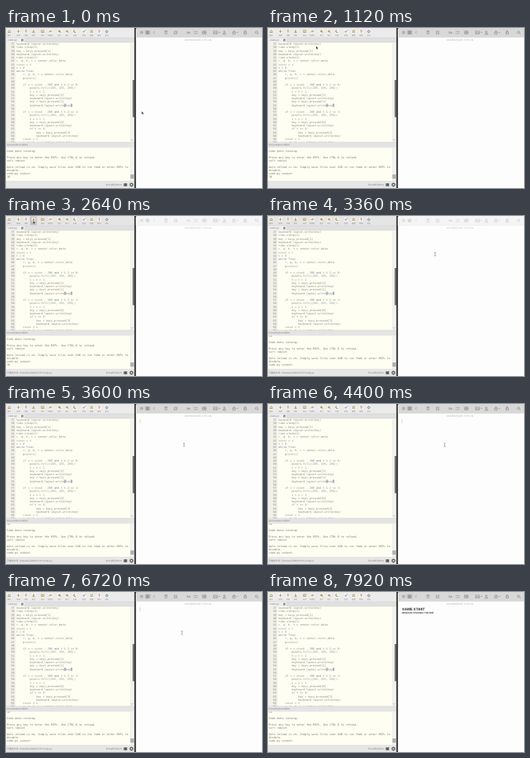
Write an HTML page that moves like this. It is 320 px wide and 200 px high and loops after 8000 ms.

```html
<!DOCTYPE html>
<html>
<head>
<meta charset="utf-8">
<style>
html, body { margin: 0; width: 100%; height: 100%; overflow: hidden; background: #fff; }
svg { display: block; width: 100vw; height: 100vh; }
text { text-rendering: geometricPrecision; white-space: pre; }
.mono { font: 3.42px "DejaVu Sans Mono", monospace; fill: #85857f; }
.repl { fill: #767670; }
.key { fill: #7a7aa2; }
.num { fill: #7c9090; }
.ui { font: 3.1px Inter, "Noto Sans CJK SC", sans-serif; fill: #777; }
.tiny { font: 2.2px "Noto Sans CJK SC", sans-serif; fill: #888; text-anchor: middle; }
.note { font-family: Inter, sans-serif; font-weight: 700; fill: #333; }
</style>
</head>
<body>
<svg id="stage" viewBox="0 0 320 200" preserveAspectRatio="none"></svg>
<script>
const LOOP = 8000, PITCH = 4.25, CHAR = 2.06, SPLIT = 160.6;
const PAPER = '#fefef2';
const stage = document.getElementById('stage');

function add(parent, tag, attrs, content) {
  const el = document.createElementNS('http://www.w3.org/2000/svg', tag);
  for (const k in attrs) el.setAttribute(k, attrs[k]);
  if (content !== undefined) el.textContent = content;
  parent.appendChild(el);
  return el;
}
const rect = (p, x, y, width, height, fill, rx = 0) => add(p, 'rect', { x, y, width, height, fill, rx });
const label = (p, x, y, s, cls, more) => add(p, 'text', { x, y, class: cls, ...more }, s);
const line = (p, d, stroke, w = 0.6) =>
  add(p, 'path', { d, stroke, fill: 'none', 'stroke-width': w, 'stroke-linecap': 'round' });
const group = (p = stage, attrs = {}) => add(p, 'g', attrs);
const show = (el, on) => el.setAttribute('visibility', on ? 'visible' : 'hidden');

const code = `keyboard_layout.write(key)
time.sleep(1)
key = keys_pressed[1]
keyboard_layout.write(key)
time.sleep(1)
r, g, b, c = sensor.color_data
cisst = c
t = 0
while True:
    r, g, b, c = sensor.color_data
    print(c)

    if c < cisst - 200 and t % 2 == 0:
        pixels.fill((255, 255, 255))
        t = t + 1
        key = keys_pressed[2]
        keyboard_layout.write(key)
        key = keys_pressed[1]
        keyboard_layout.write(key)

    if c < cisst - 200 and t % 2 == 1:
        pixels.fill((255, 255, 255))
        t = t + 1
        key = keys_pressed[0]
        keyboard_layout.write(key)
        if t >= 4:
            key = keys_pressed[3]
            keyboard_layout.write(key)
    cisst = c
    r, g, b, c = sensor.color_data`.split('\n');

const output = `18

Code done running.

Press any key to enter the REPL. Use CTRL-D to reload.
soft reboot

Auto-reload is on. Simply save files over USB to run them or enter REPL to
disable.
code.py output:
18`.split('\n');

function codeLine(p, s, i) {
  const y = 21.2 + i * PITCH, indent = s.search(/\S|$/);
  label(p, 10.6, y, 37 + i, 'mono', { 'text-anchor': 'end' });
  const t = label(p, 13 + indent * CHAR, y, '', 'mono');
  for (const part of s.trim().split(/\b(while|if|and|True|\d+)\b/)) {
    const cls = /^\d+$/.test(part) ? 'num' : /^(while|if|and|True)$/.test(part) ? 'key' : '';
    add(t, 'tspan', { class: cls }, part);
  }
}

// Editor window
rect(stage, 0, 0, SPLIT, 200, PAPER);
rect(stage, 0, 18, 12, 125, '#f1f1ea');
const codeArea = group();
for (const col of [29, 33]) rect(codeArea, 12.8 + col * CHAR, 94.6, 2.3, 4, '#b4bad6');
code.forEach((s, i) => codeLine(codeArea, s, i));

const bar = rect(stage, 0, 0, SPLIT, 12, '#ebebeb');
rect(stage, 0, 12, SPLIT, 6, '#e0e0e0');
rect(stage, 0, 12.3, 23, 5.7, '#efefef');
label(stage, 2, 16.2, 'code.py', 'ui');
rect(stage, 19, 13.8, 2.6, 2.6, '#777', 0.5);
line(stage, 'M19.7 14.5l1.2 1.2m0 -1.2l-1.2 1.2', '#eee', 0.35);
line(stage, 'M0 12H160M23 18H160', '#cccccc', 0.4);

const saveGlow = rect(stage, 30, 0.6, 8.6, 11, '#c4c4c4', 1);
const lens = 'M-1.7 -.2A1.5 1.5 0 1 1 1.3 -.2A1.5 1.5 0 1 1 -1.7 -.2M1 1L2.2 2.2M-1 -.2H.6';
const toolGroups = [
  [['模式', 'M-1.5 1.8V-1.5H1.5V1.8M-2 1.8H2']],
  [['新建', 'M0 -2V2M-2 0H2'],
   ['加载', 'M0 2V-2M-1.7 -.2L0 -2L1.7 -.2'],
   ['保存', 'M0 -2V1M-1.7 -.6L0 1L1.7 -.6M-2 2H2']],
  [['串口', 'M-2 -1.8H2V1.8H-2ZM-1 -.6L0 .2L-1 1'],
   ['绘图仪', 'M-2 1L-1 -1L0 1.4L1 -1.8L2 0']],
  [['放大', lens + 'M-.2 -1V.6'],
   ['缩小', lens],
   ['主题', 'M1.3 1.5A2 2 0 1 1 0 -2A1.6 1.6 0 0 0 1.3 1.5']],
  [['检查', 'M-1.8 0L-.5 1.6L2 -1.8', '#55627a'],
   ['整理', 'M-2 -1.5H2M-1.4 0H1.4M-2 1.5H2'],
   ['帮助', 'M-1.2 -1A1.2 1.2 0 1 1 0 .4V.8M0 1.9V2', '#b5574a'],
   ['退出', 'M-1 -1.4A2 2 0 1 0 1 -1.4M0 -2V0', '#55627a']]
];
let toolX = 4;
for (const tools of toolGroups) {
  for (const [name, d, color = '#a5853c'] of tools) {
    rect(stage, toolX - 2.4, 1.8, 4.8, 4.8, '#f8f7f0', 0.8);
    line(group(stage, { transform: `translate(${toolX} 4.2) scale(.75)` }), d, color, 0.9);
    label(stage, toolX, 10, name, 'tiny');
    toolX += 9.5;
  }
  toolX += 2;
}

// Scroll bars
rect(stage, 155, 18, SPLIT - 155, 125, '#f1f1ee');
rect(stage, 158.4, 65, SPLIT - 158.4, 46.5, '#666');
line(stage, 'M156.5 139.5l1 1l1 -1', '#888', 0.5);

// REPL panel
rect(stage, 0, 143, SPLIT, 57, PAPER);
const repl = group();
output.forEach((s, i) => label(repl, 1, 147.1 + i * 4, s, 'mono repl'));
rect(stage, 0, 142.8, SPLIT, 6.8, '#e4e4e4');
line(stage, 'M0 142.8H160', '#cacaca', 0.4);
label(stage, 1, 147.2, 'CircuitPython REPL', 'ui', { style: 'font-size:2.9px' });
rect(stage, 155, 150, SPLIT - 155, 41.5, '#f1f1ee');
rect(stage, 155.5, 183, 4.4, 5.4, '#b0b0b0');

// Status bar
rect(stage, 0, 191.5, SPLIT, 8.5, '#e6e6e6');
line(stage, 'M0 191.5H160', '#d2d2d2', 0.4);
const saved = label(stage, 1, 197.1, '已储存文件: /Volumes/CIRCUITPY/code.py', 'ui', { style: 'font-size:2.85px' });
label(stage, 124.8, 197.1, 'CircuitPython', 'ui');
rect(stage, 147.4, 194.2, 3.8, 3.6, '#555', 0.6);
line(stage, 'M146.9 195H151.7M146.9 197H151.7', '#777', 0.4);
add(stage, 'circle', { cx: 156.8, cy: 196, r: 1.6, fill: 'none', stroke: '#555', 'stroke-width': 1.1 });
add(stage, 'circle', { cx: 156.8, cy: 196, r: 2.3, fill: 'none', stroke: '#555', 'stroke-width': 0.6, 'stroke-dasharray': '0.9 0.9' });

// Notes window
rect(stage, SPLIT, 0, 160, 200, '#111');
rect(stage, 162.3, 0, 160, 203, '#fdfdfd', 1.5);
const noteBar = add(stage, 'path', { d: 'M162.3 11.6V1.5Q162.3 0 163.8 0H320V11.6Z' });
const noteEdge = line(stage, 'M162.3 11.6H320', '#c8c8c8', 0.4);
const noteIcons = group();
const icon = (x, d) => line(group(noteIcons, { transform: `translate(${x} 5.6)` }), d, '#808080', 0.55);
const noteBox = rect(noteIcons, 173.5, 2.6, 7.4, 6, '#c6c6c6', 1);
icon(169.5, 'M-1.6 -1.3H1.6M-1.6 0H1.6M-1.6 1.3H1.6');
icon(177.2, 'M-1.7 -1.7H-.4V-.4H-1.7ZM.4 -1.7H1.7V-.4H.4ZM-1.7 .4H-.4V1.7H-1.7ZM.4 .4H1.7V1.7H.4Z');
icon(185, 'M.5 -1.3L-.7 0L.5 1.3');
icon(200, 'M-1.6 -1.4H1.6M-1.2 -1.4L-.9 2H.9L1.2 -1.4M-.4 -2H.4');
icon(212, 'M.6 -1.5H-1.7V1.8H1.6V-.4M-.3 .4L2 -2');
label(noteIcons, 228, 7, 'Aa', 'ui', { 'text-anchor': 'middle', style: 'font-size:4px' });
icon(237, 'M-2 -1.2l.5 .5l.8 -1M.2 -1H2.2M-2 1.2l.5 .5l.8 -1M.2 1.2H2.2');
icon(248, 'M-2 -1.7H2V1.7H-2ZM-2 0H2M0 -1.7V1.7');
icon(262, 'M-2.2 -1.7H2.2V1.7H-2.2ZM-2 1.3L-.6 -.4L.5 .8L1.2 0L2 1');
icon(266.8, 'M-.7 -.4L0 .4L.7 -.4');
icon(273, 'M-.9 -1A.9 .9 0 1 1 .9 -1A.9 .9 0 1 1 -.9 -1M-1.8 1.9A1.8 1.5 0 0 1 1.8 1.9Z');
icon(285, 'M-1.5 -.4H1.5V2H-1.5ZM-.9 -.4V-1.2A.9 .9 0 0 1 .9 -1.2V-.4');
icon(289.2, 'M-.7 -.4L0 .4L.7 -.4');
icon(299, 'M-.8 -.7H-1.5V2H1.5V-.7H.8M0 .7V-2.2M-.9 -1.3L0 -2.2L.9 -1.3');
icon(313.5, 'M-1.8 -.3A1.5 1.5 0 1 1 1.2 -.3A1.5 1.5 0 1 1 -1.8 -.3M.9 .8L2.1 2');
const date = label(stage, 239.8, 16.1, '2021年3月20日 上午5:06', 'ui', { 'text-anchor': 'middle', style: 'font-size:2.9px;fill:#b0b0b0' });
const caret = line(stage, 'M167.6 19.2V23.8', '#c9b67a', 0.5);
const title = label(stage, 167.6, 22.8, '', 'note', { 'font-size': 4.4 });
const body = label(stage, 167.6, 26.6, '', 'note', { 'font-size': 2.85, style: 'font-weight:600' });

// Pointer
const arrow = group();
add(arrow, 'path', { d: 'M0 0V4L1 3.1L1.7 4.6L2.4 4.3L1.7 2.9H3Z', fill: '#222', stroke: '#fff', 'stroke-width': 0.35 });
const beam = group();
line(beam, 'M-.9 -2.2Q0 -2.2 0 -1.6V1.6Q0 2.2 -.9 2.2M.9 -2.2Q0 -2.2 0 -1.6M0 1.6Q0 2.2 .9 2.2', '#666', 0.45);

// time, x, y
const path = [
  [0, 169.5, 104], [640, 169.5, 104], [1120, 60, 22.5], [1280, 60, 22.5],
  [1840, 34, 6], [2960, 34, 6], [3440, 222.5, 51], [3920, 222.5, 51], [4640, 220, 51], [8000, 220, 51]
];
function pointerAt(t) {
  const i = Math.max(1, path.findIndex(p => p[0] > t));
  const [t0, x0, y0] = path[i - 1], [t1, x1, y1] = path[i];
  const u = (t - t0) / (t1 - t0), e = u * u * (3 - 2 * u);
  return [x0 + (x1 - x0) * e, y0 + (y1 - y0) * e];
}
const typed = (s, t, start, step) => s.slice(0, Math.max(0, Math.floor((t - start) / step)));

function draw(t) {
  const focus = t < 1920 || t >= 3440;
  bar.setAttribute('fill', focus ? '#ebebeb' : '#e5e5e5');
  noteBar.setAttribute('fill', focus ? '#d8d8d8' : '#f5f5f5');
  noteEdge.setAttribute('opacity', focus ? 1 : 0.5);
  noteIcons.setAttribute('opacity', focus ? 1 : 0.4);
  date.setAttribute('opacity', focus ? 1 : 0.8);
  show(noteBox, focus);
  show(saveGlow, t >= 1840 && t < 3040);
  show(saved, t >= 2400 && t < 7400);

  const reloaded = t >= 3200;
  repl.setAttribute('transform', `translate(0 ${reloaded ? 4 : 0})`);
  show(repl.firstChild, reloaded);
  show(repl.lastChild, !reloaded);

  title.textContent = typed('GAME START', t, 6960, 24);
  body.textContent = typed('MISSION: DIVIDING THE END', t, 7280, 16);
  show(caret, t >= 3440 && t < 6960);

  const [x, y] = pointerAt(t), overNote = x > 200;
  for (const el of [arrow, beam]) el.setAttribute('transform', `translate(${x} ${y})`);
  show(arrow, !overNote);
  show(beam, overNote && t < 7000);
}

function tick() {
  draw(performance.now() % LOOP);
  requestAnimationFrame(tick);
}
tick();
</script>
</body>
</html>
```
